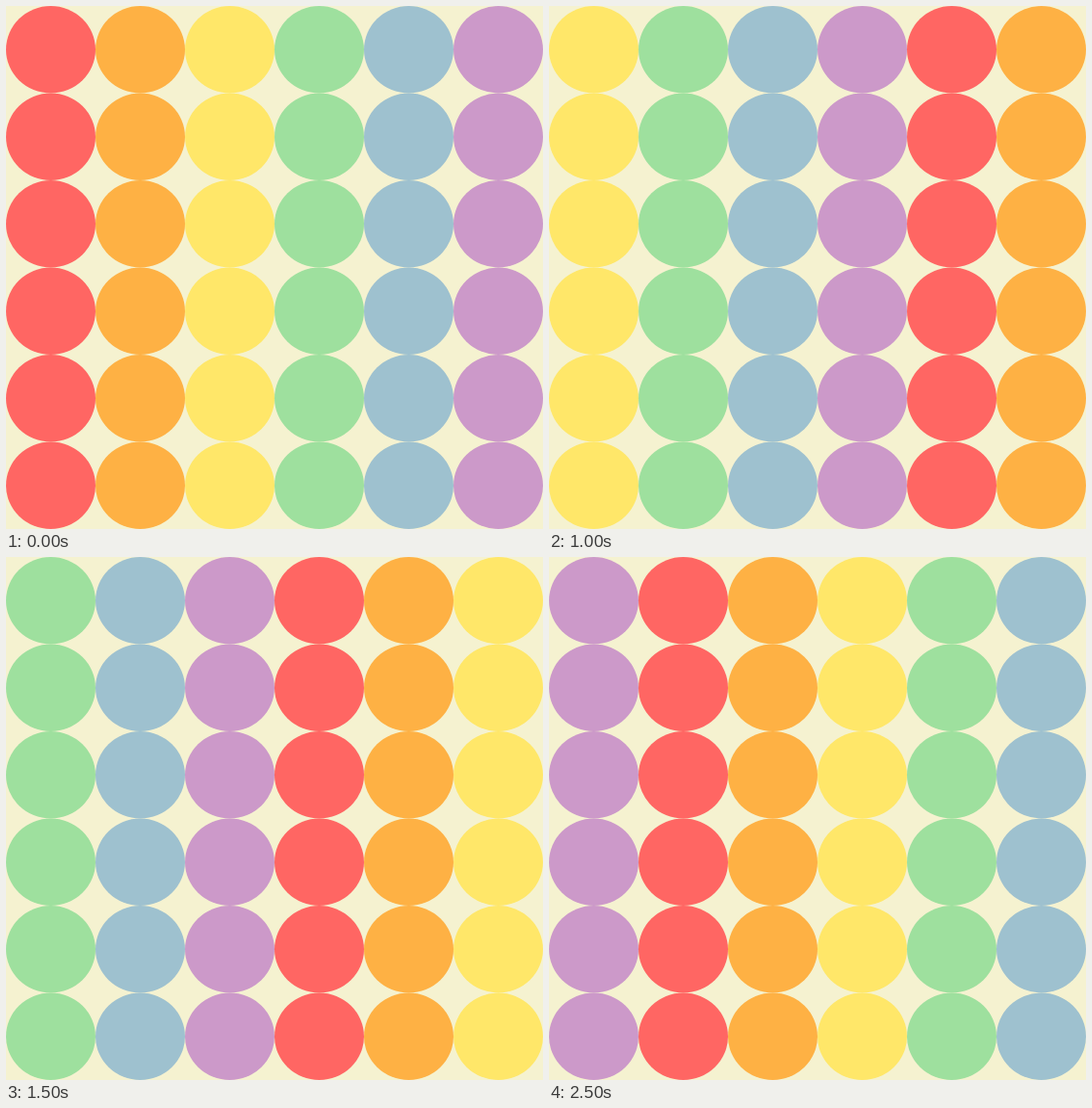
Recreate the animation shown at these times as an HTML page. Size 558 by 543 pixels, loop 3000 ms.

```html
<!DOCTYPE html>
<html lang="en">
<head>
<meta charset="utf-8">
<title>Rainbow dots</title>
<style>
  html, body { margin: 0; width: 100%; height: 100%; overflow: hidden; background: #f5f2d0; }
  svg { display: block; width: 558px; height: 543px; }
</style>
</head>
<body>
<svg id="stage" viewBox="0 0 558 543"></svg>
<script>
const COLORS = ['#ff6663', '#feb144', '#ffe769', '#9ee09e', '#9ec1cf', '#cc99c9'];
const COUNT = COLORS.length;
const STEP = 500;
const CELL_W = 558 / COUNT;
const CELL_H = 543 / COUNT;

const stage = document.getElementById('stage');

function add(parent, tag, attrs = {}) {
  const el = document.createElementNS('http://www.w3.org/2000/svg', tag);
  for (const [key, value] of Object.entries(attrs)) el.setAttribute(key, value);
  return parent.appendChild(el);
}

for (let col = 0; col < COUNT; col++) {
  const column = add(stage, 'g', { fill: COLORS[col] });
  for (let row = 0; row < COUNT; row++) {
    add(column, 'ellipse', {
      cx: (col + 0.5) * CELL_W,
      cy: (row + 0.5) * CELL_H,
      rx: CELL_W / 2,
      ry: CELL_H / 2
    });
  }

  // Each column takes its right neighbour's colour at every step.
  const frames = Array.from({ length: COUNT + 1 }, (_, i) => ({
    fill: COLORS[(col + i) % COUNT],
    offset: i / COUNT,
    easing: 'step-end'
  }));
  column.animate(frames, { duration: STEP * COUNT, iterations: Infinity });
}
</script>
</body>
</html>
```
